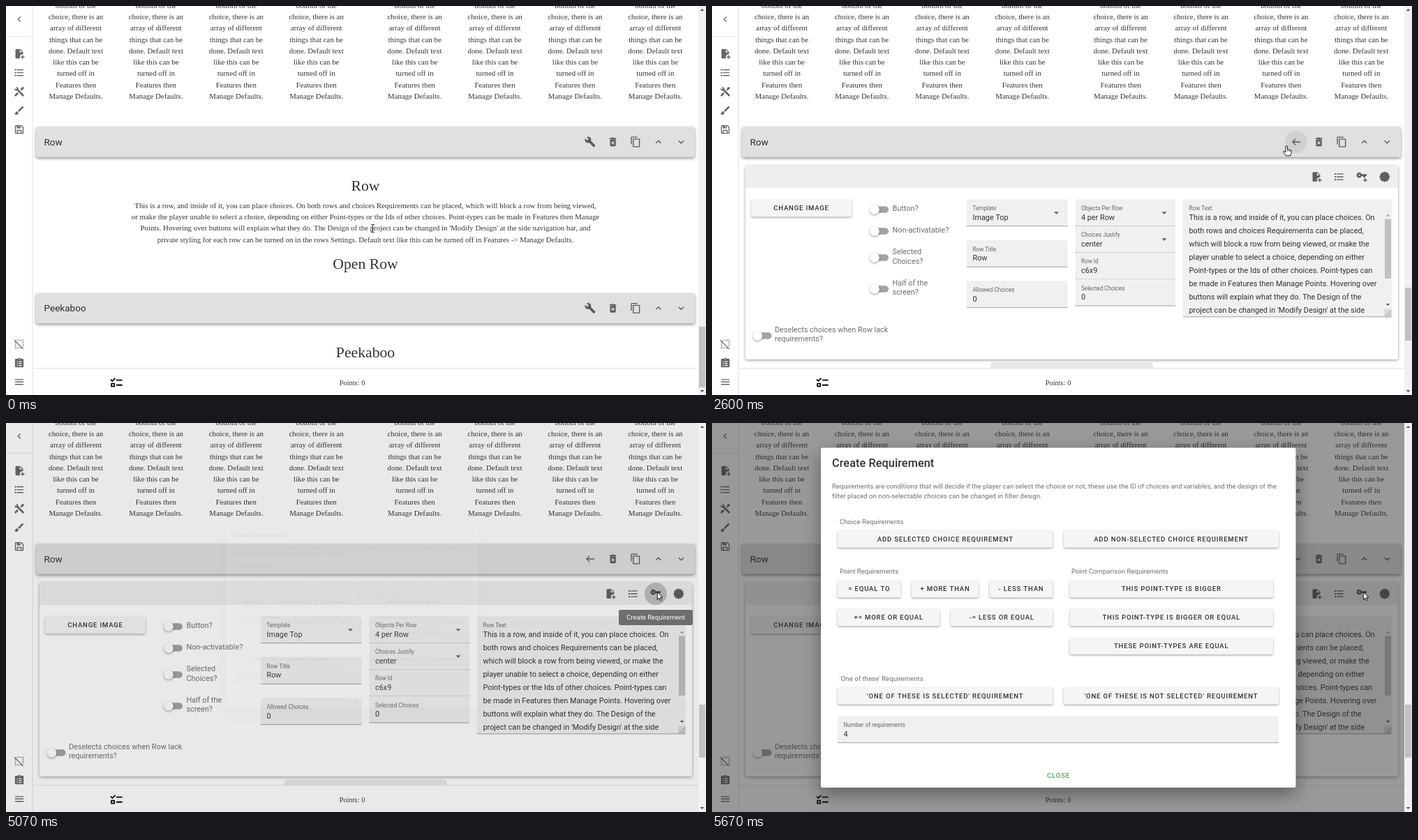
Write an HTML page with a canvas that moves like this. It is 1003 px wide and 558 px high and loops after 7.27 s.

```html
<!DOCTYPE html>
<html lang="en">
<head>
<meta charset="utf-8">
<title>Row editor</title>
<style>
html, body { margin: 0; width: 100%; height: 100%; overflow: hidden; background: #fff; }
canvas { display: block; }
</style>
</head>
<body>
<canvas id="stage" width="1003" height="558"></canvas>
<script>
const W = 1003, H = 558, LOOP = 7270, STEP = 1000 / 15;
const screenCtx = document.getElementById('stage').getContext('2d');
const layer = document.createElement('canvas');
layer.width = W;
layer.height = H;
const layerCtx = layer.getContext('2d');
let ctx = screenCtx;

const SANS = 'Roboto, sans-serif', SERIF = '"Liberation Serif", "Times New Roman", serif';
const Z = 0.6786; // page zoom
const BODY = 16 * Z, SMALL = 14 * Z, LABEL = 12 * Z;
const INK = 'rgba(0,0,0,.8)', SOFT = 'rgba(0,0,0,.58)', ICON = 'rgba(0,0,0,.6)';

const ICONS = {};
function defineIcon(name, d) { ICONS[name] = new Path2D(d); }
defineIcon('left', 'M15.4 16.6 10.8 12l4.6-4.6L14 6l-6 6 6 6z');
defineIcon('up', 'M7.4 15.4 12 10.8l4.6 4.6L18 14l-6-6-6 6z');
defineIcon('down', 'M7.4 8.6 12 13.2l4.6-4.6L18 10l-6 6-6-6z');
defineIcon('addFile', 'M14 2H6a2 2 0 0 0-2 2v16a2 2 0 0 0 2 2h7.8A6 6 0 0 1 20 13V8zM13 9V3.5L18.5 9zM18 15h2v3h3v2h-3v3h-2v-3h-3v-2h3z');
defineIcon('list', 'M7 5h14v2H7zM7 11h14v2H7zM7 17h14v2H7zM2.5 4.5h3v3h-3zM2.5 10.5h3v3h-3zM2.5 16.5h3v3h-3z');
defineIcon('tools', 'M21.7 20.3l-1.4 1.4a1 1 0 0 1-1.4 0L7 9.9A4 4 0 0 1 2.2 4.7l2.6 2.5 2.4-2.4L4.7 2.2A4 4 0 0 1 9.9 7l11.800 11.900a1 1 0 0 1 0 1.400zM2.300 18.900a1 1 0 0 0 0 1.400l1.400 1.400a1 1 0 0 0 1.400 0l5.500-5.400-2.800-2.900zM20 2l-4 2v2l-2.200 2.200 2 2L18 8h2l2-4z');
defineIcon('brush', 'M20.7 4.6l-1.3-1.3a1 1 0 0 0-1.4 0L9 12.3 11.8 15l9-9a1 1 0 0 0 0-1.4zM7 14a3 3 0 0 0-3 3c0 1.3-1.2 2-2 2a5.5 5.5 0 0 0 4 2 4 4 0 0 0 4-4 3 3 0 0 0-3-3z');
defineIcon('save', 'M5 3h12l4 4v12a2 2 0 0 1-2 2H5a2 2 0 0 1-2-2V5a2 2 0 0 1 2-2zM5 5v14h14V7.8L16.2 5zM7 5h8v4.5H7zM11.5 5h2v2.500h-2zM7 13h10v6H7zM9 15h6v4H9z');
defineIcon('selectOff', 'M1 4.3 2.3 3 21 21.7 19.7 23 17 20.3V21h-2v-2h.7L5 8.3V9H3V7h.7zM19 3h2v2h-2zM15 3h2v2h-2zM11 3h2v2h-2zM7 3h2v2H7zM11 19h2v2h-2zM7 19h2v2H7zM3 19h2v2H3zM3 15h2v2H3zM19 15h2v2h-2zM3 11h2v2H3zM19 11h2v2h-2zM19 7h2v2h-2z');
defineIcon('clipboard', 'M19 3h-4.2a3 3 0 0 0-5.6 0H5a2 2 0 0 0-2 2v14a2 2 0 0 0 2 2h14a2 2 0 0 0 2-2V5a2 2 0 0 0-2-2zM12 3a1 1 0 0 1 0 2 1 1 0 0 1 0-2zM7 8h2v2H7zM11 8h6v2h-6zM7 12h2v2H7zM11 12h6v2h-6zM7 16h2v2H7zM11 16h6v2h-6z');
defineIcon('menu', 'M3 6h18v2H3zM3 11h18v2H3zM3 16h18v2H3z');
defineIcon('wrench', 'M22.7 19l-9.1-9.1c.9-2.3.4-5-1.5-6.9-2-2-5-2.4-7.4-1.3L9 6 6 9 1.6 4.7C.4 7.1.9 10.1 2.9 12.1c1.9 1.9 4.6 2.4 6.9 1.5l9.1 9.1c.4.4 1 .4 1.4 0l2.3-2.3c.5-.4.5-1.1.1-1.4z');
defineIcon('trash', 'M6 19a2 2 0 0 0 2 2h8a2 2 0 0 0 2-2V7H6zM8.5 11.9l1.4-1.4L12 12.6l2.1-2.1 1.4 1.4L13.4 14l2.1 2.1-1.4 1.4L12 15.4l-2.1 2.1-1.4-1.4L10.6 14zM15.5 4l-1-1h-5l-1 1H5v2h14V4z');
defineIcon('copy', 'M19 21H8V7h11zM19 5H8a2 2 0 0 0-2 2v14a2 2 0 0 0 2 2h11a2 2 0 0 0 2-2V7a2 2 0 0 0-2-2zM16 1H4a2 2 0 0 0-2 2v14h2V3h12z');
defineIcon('back', 'M21 11v2H7l4.7 4.7-1.4 1.4L3.2 12l7.1-7.1 1.4 1.4L7 11z');
defineIcon('addKey', 'M6.5 3a5.5 5.5 0 1 0 5.1 7.5H15V14h4v-3.5h3v-4H11.6A5.5 5.5 0 0 0 6.5 3zM6.5 7a1.5 1.5 0 0 1 0 3 1.5 1.5 0 0 1 0-3zM18 15v3h-3v2h3v3h2v-3h3v-2h-3v-3z');
defineIcon('checks', 'M12 7h10v2.2H12zM12 15.2h10v2.2H12zM4 12.800h4.800a1 1 0 0 1 1 1v4.800a1 1 0 0 1-1 1H4a1 1 0 0 1-1-1v-4.800a1 1 0 0 1 1-1zM5 14.800v2.800h2.800v-2.800zM5.500 11.200 2 7.700l1.500-1.500 2 2L9.500 4.200l1.500 1.500z');

const seal = new Path2D();
for (let i = 0; i < 24; i++) {
  const r = i % 2 ? 9.6 : 11.2, a = i * Math.PI / 12;
  seal.lineTo(12 + r * Math.sin(a), 12 - r * Math.cos(a));
}
ICONS.seal = seal;

const HAND = new Path2D('M-1.3 8V1.2a1.3 1.3 0 0 1 2.6 0V5q1.5-.6 2 .5 1.5-.5 2 .6 1.6-.3 1.6 1.2V10l-1.2 2.3V14H-1l-3.4-5q-.8-1.5.6-1.7 1 0 2.5 2z');
const ARROW = new Path2D('M0 0V10.8L2.5 8.5 4.1 12.2 5.8 11.4 4.2 7.8 7.6 7.7z');
const BEAM = new Path2D('M-2.3-5.5H-.5L0-5 .5-5.5H2.3M0-5V5M-2.3 5.5H-.5L0 5 .5 5.5H2.3');
const KNUCKLES = new Path2D('M1.3 5v3M3.3 5.5v2.5M5.3 6.1v2');

const clamp = v => Math.max(0, Math.min(1, v));
const mix = (a, b, p) => a + (b - a) * p;
const smooth = p => p * p * (3 - 2 * p);

// Cubic-bezier timing, solved by bisection
function bezier(x1, y1, x2, y2) {
  const at = (a, b, u) => 3 * a * u * (1 - u) ** 2 + 3 * b * u * u * (1 - u) + u ** 3;
  return x => {
    if (x <= 0 || x >= 1) return clamp(x);
    let lo = 0, hi = 1;
    for (let i = 0; i < 24; i++) {
      const mid = (lo + hi) / 2;
      if (at(x1, x2, mid) < x) lo = mid; else hi = mid;
    }
    return at(y1, y2, lo);
  };
}
const easeDialog = bezier(0.25, 0.8, 0.25, 1);
const easeSwift = bezier(0.25, 0.8, 0.5, 1);

function rect(x, y, w, h, fill) {
  ctx.fillStyle = fill;
  ctx.fillRect(x, y, w, h);
}

function box(x1, y1, x2, y2, fill, shadow, radius = 2.7) {
  ctx.save();
  if (shadow) {
    ctx.shadowOffsetY = shadow[0];
    ctx.shadowBlur = shadow[1];
    ctx.shadowColor = `rgba(0,0,0,${shadow[2]})`;
  }
  ctx.fillStyle = fill;
  ctx.beginPath();
  ctx.roundRect(x1, y1, x2 - x1, y2 - y1, radius);
  ctx.fill();
  ctx.restore();
}

function disc(x, y, r, fill) {
  ctx.fillStyle = fill;
  ctx.beginPath();
  ctx.arc(x, y, r, 0, 7);
  ctx.fill();
}

// y is the visual middle of the line
function text(s, x, y, size, { font = SANS, weight = 400, color = INK, align = 'left', gap = 0 } = {}) {
  ctx.font = `${weight} ${size}px ${font}`;
  ctx.letterSpacing = gap + 'px';
  ctx.textAlign = align;
  ctx.fillStyle = color;
  ctx.fillText(s, x, y + size * 0.34);
}

const serif = (s, x, y, size = BODY) => text(s, x, y, size, { font: SERIF, align: 'center' });

function icon(name, x, y, size = 16.4, color = ICON) {
  ctx.save();
  ctx.translate(x - size / 2, y - size / 2);
  ctx.scale(size / 24, size / 24);
  ctx.fillStyle = color;
  ctx.fill(ICONS[name], 'evenodd');
  ctx.restore();
}

function triangle(x, y, w, h, color) {
  ctx.fillStyle = color;
  ctx.beginPath();
  ctx.moveTo(x - w, y - h);
  ctx.lineTo(x + w, y - h);
  ctx.lineTo(x, y + h);
  ctx.fill();
}

function button(label, x1, x2, y) {
  box(x1, y - 12.2, x2, y + 12.2, '#f5f5f5', [1.3, 3, 0.36]);
  text(label, (x1 + x2) / 2, y, SMALL, { weight: 500, align: 'center', gap: SMALL * 0.0893 });
}

function field(label, value, x1, x2, y, caret) {
  box(x1, y, x2, y + 38.5, '#f0f0f0', null, [2.7, 2.7, 0, 0]);
  rect(x1, y + 38, x2 - x1, 0.8, '#8c8c8c');
  text(label, x1 + 8.5, y + 13.2, LABEL, { color: SOFT });
  text(value, x1 + 8.5, y + 25.8, BODY);
  if (caret) triangle(x2 - 16, y + 19.7, 3.5, 1.8, ICON);
}

function toggle(x, y) {
  box(x - 2, y - 4.7, x + 20, y + 4.7, 'rgba(0,0,0,.36)', null, 4.7);
  box(x - 6.8, y - 6.8, x + 6.8, y + 6.8, '#fff', [1.3, 3.5, 0.38], 6.8);
}

function sidebar() {
  rect(0, 0, 38, H, '#fff');
  rect(37.5, 0, 1, H, '#e0e0e0');
  rect(0, 43, 38, 0.8, '#e0e0e0');
  icon('left', 19, 19);
  ['addFile', 'list', 'tools', 'brush', 'save'].forEach((n, i) => icon(n, 19, 68.5 + i * 27.15));
  ['selectOff', 'clipboard', 'menu'].forEach((n, i) => icon(n, 19, 485 + i * 27.15));
}

const BLURB = ['bottom of the', 'choice, there is an', 'array of different', 'things that can be', 'done. Default text',
  'like this can be', 'turned off in', 'Features then', 'Manage Defaults.'];
const INTRO = [
  'This is a row, and inside of it, you can place choices. On both rows and choices Requirements can be placed, which will block a row from being viewed,',
  'or make the player unable to select a choice, depending on either Point-types or the Ids of other choices. Point-types can be made in Features then Manage',
  "Points. Hovering over buttons will explain what they do. The Design of the project can be changed in 'Modify Design' at the side navigation bar, and",
  'private styling for each row can be turned on in the rows Settings. Default text like this can be turned off in Features -> Manage Defaults.'];
const ROW_TEXT = ['This is a row, and inside of it, you can place choices. On', 'both rows and choices Requirements can be placed,',
  'which will block a row from being viewed, or make the', 'player unable to select a choice, depending on either',
  'Point-types or the Ids of other choices. Point-types can', 'be made in Features then Manage Points. Hovering over',
  'buttons will explain what they do. The Design of the', "project can be changed in 'Modify Design' at the side"];

function header(title, y, first, glow) {
  box(43, y - 21.8, 987, y + 21.8, '#e0e0e0', [2, 4.5, 0.42]);
  text(title, 54.5, y, 20 * Z);
  if (glow) disc(837, y, 16, `rgba(0,0,0,${glow})`);
  [first, 'trash', 'copy', 'up', 'down'].forEach((n, i) => icon(n, 837 + i * 32.6, y));
}

function closedRow() {
  serif('Row', 515, 258, 32 * Z);
  INTRO.forEach((s, i) => serif(s, 515, 286 + i * 16.3));
  serif('Open Row', 515, 370, 32 * Z);
  header('Peekaboo', 433.5, 'wrench', 0);
  serif('Peekaboo', 515, 496.5, 32 * Z);
}

function editor(glow) {
  box(48, 229, 983, 507, '#fff', [1.3, 4, 0.38]);
  box(48, 229, 983, 261, '#eee', null, [2.7, 2.7, 0, 0]);
  if (glow) disc(931, 245, 16, `rgba(0,0,0,${glow})`);
  ['addFile', 'list', 'addKey', 'seal'].forEach((n, i) => icon(n, 866 + i * 32.6, 245));

  button('CHANGE IMAGE', 56, 200, 290);
  [292, 323, 361, 406].forEach(y => toggle(233, y));
  toggle(65.5, 473);
  const note = (s, x, y) => text(s, x, y, BODY, { color: SOFT });
  note('Button?', 258.5, 290);
  note('Non-activatable?', 258.5, 321);
  note('Selected', 258.5, 352.5);
  note('Choices?', 258.5, 366);
  note('Half of the', 258.5, 397);
  note('screen?', 258.5, 410.5);
  note('Deselects choices when Row lack', 90, 464);
  note('requirements?', 90, 477.5);

  field('Template', 'Image Top', 365, 509.5, 277.3, true);
  field('Row Title', 'Row', 365, 509.5, 335.8);
  field('Allowed Choices', '0', 365, 509.5, 394.3);
  field('Objects Per Row', '4 per Row', 520.5, 664, 277.3, true);
  field('Choices Justify', 'center', 520.5, 664, 315.4, true);
  field('Row Id', 'c6x9', 520.5, 664, 353.5);
  field('Selected Choices', '0', 520.5, 664, 391.6);

  box(675, 277.3, 974, 446, '#f0f0f0', null, [2.7, 2.7, 0, 0]);
  text('Row Text', 683.5, 290.5, LABEL, { color: SOFT });
  ROW_TEXT.forEach((s, i) => text(s, 683.5, 303 + i * 19, BODY));
  rect(963, 295, 11, 139, '#f1f1f1');
  rect(964, 305.5, 9, 85.5, '#c1c1c1');
  triangle(968.5, 300, 2.8, -1.5, '#a0a0a0');
  triangle(968.5, 428.5, 2.8, 1.5, '#505050');
  rect(963, 434.5, 11, 11.5, '#dcdcdc');
  ctx.strokeStyle = '#777';
  ctx.lineWidth = 0.7;
  ctx.beginPath();
  for (const d of [4, 8]) {
    ctx.moveTo(973 - d, 445);
    ctx.lineTo(973, 445 - d);
  }
  ctx.stroke();
  rect(675, 445.5, 299, 0.8, '#8c8c8c');
  box(400, 512, 630.5, 530, '#e8e8e8', [0.5, 2, 0.35]);
}

function footer() {
  rect(38, 519.5, 954, 39, '#fff');
  rect(38, 519.3, 954, 1, '#e2e2e2');
  icon('checks', 158, 540, 20.8, '#000');
  serif('Points: 0', 496, 540, 10.4);
}

function scrollbar(top, bottom) {
  rect(992, 0, 11, H, '#f1f1f1');
  rect(993, top, 9, bottom - top, '#c1c1c1');
  triangle(997.5, 5.5, 2.8, -1.5, '#505050');
  triangle(997.5, 552.5, 2.8, 1.5, '#505050');
}

function tooltip(scale, alpha) {
  ctx.save();
  ctx.globalAlpha = alpha;
  ctx.translate(931, 279);
  ctx.scale(scale, scale);
  box(-53, -11, 53, 11, 'rgba(97,97,97,.9)');
  text('Create Requirement', 0, 0, SMALL, { color: '#fff', align: 'center' });
  ctx.restore();
}

function dialogContent() {
  box(156, 35.5, 836.5, 523, '#fff', [9, 26, 0.4]);
  text('Create Requirement', 172, 57, 24 * Z, { weight: 500, gap: 0.08 });
  const soft = (s, x, y) => text(s, x, y, SMALL, { color: SOFT, gap: 0.067 });
  soft('Requirements are conditions that will decide if the player can select the choice or not, these use the ID of choices and variables, and the design of the', 172, 90.5);
  soft('filter placed on non-selectable choices can be changed in filter design.', 172, 105);
  soft('Choice Requirements', 183, 141.5);
  button('ADD SELECTED CHOICE REQUIREMENT', 180, 488.5, 166.5);
  button('ADD NON-SELECTED CHOICE REQUIREMENT', 504, 812, 166.5);
  soft('Point Requirements', 183, 213);
  button('= EQUAL TO', 180, 270.5, 238);
  button('+ MORE THAN', 286, 382, 238);
  button('- LESS THAN', 397.5, 488.5, 238);
  button('+= MORE OR EQUAL', 180, 326.5, 279);
  button('-= LESS OR EQUAL', 342, 488.5, 279);
  soft('Point Comparison Requirements', 515, 213);
  button('THIS POINT-TYPE IS BIGGER', 512.5, 804, 238);
  button('THIS POINT-TYPE IS BIGGER OR EQUAL', 512.5, 804, 279);
  button('THESE POINT-TYPES ARE EQUAL', 512.5, 804, 319.8);
  soft("'One of these' Requirements", 183, 366.5);
  button("'ONE OF THESE IS SELECTED' REQUIREMENT", 180, 488.5, 391.5);
  button("'ONE OF THESE IS NOT SELECTED' REQUIREMENT", 504, 812, 391.5);
  field('Number of requirements', '4', 180, 812, 420.3);
  text('CLOSE', 496.5, 506, SMALL, { weight: 500, color: '#43a547', align: 'center', gap: SMALL * 0.0893 });
}

function dialog(p) {
  if (p <= 0) return;
  const scale = mix(0.5, 1, p);
  ctx = layerCtx;
  ctx.clearRect(0, 0, W, H);
  ctx.save();
  ctx.translate(496.2, 279.2);
  ctx.scale(scale, scale);
  ctx.translate(-496.2, -279.2);
  dialogContent();
  ctx.restore();
  ctx = screenCtx;
  ctx.globalAlpha = p;
  ctx.drawImage(layer, 0, 0);
  ctx.globalAlpha = 1;
}

// Pointer stops: time, x, y
const PATH = [[733, 525.5, 319], [1467, 829, 209], [1800, 834, 194.5], [2467, 834, 194.5],
  [2733, 811, 207], [3200, 922, 228], [3400, 933.3, 242.5]];

function pointerAt(t) {
  const i = PATH.findIndex(k => k[0] > t);
  if (i === 0) return PATH[0].slice(1);
  if (i < 0) return PATH[PATH.length - 1].slice(1);
  const [a, b] = [PATH[i - 1], PATH[i]];
  const p = smooth((t - a[0]) / (b[0] - a[0]));
  return [mix(a[1], b[1], p), mix(a[2], b[2], p)];
}

function pointer(t) {
  const [x, y] = pointerAt(t);
  const near = (cx, cy) => Math.hypot(x - cx, y - cy) < 16;
  ctx.save();
  ctx.translate(x, y);
  ctx.lineJoin = 'round';
  ctx.strokeStyle = '#000';
  ctx.fillStyle = '#fff';
  ctx.lineWidth = 0.9;
  if (t < 2000 && x < 850 && y > 278) {
    ctx.stroke(BEAM);
  } else if (near(837, 195) || (t < 5050 && near(931, 245))) {
    ctx.translate(0.8, 0);
    ctx.fill(HAND);
    ctx.stroke(HAND);
    ctx.lineWidth = 0.6;
    ctx.stroke(KNUCKLES);
  } else {
    ctx.fill(ARROW);
    ctx.stroke(ARROW);
  }
  ctx.restore();
}

// Last value whose start time has passed
const stage = (t, ...steps) => steps.reduce((v, [at, next]) => t >= at ? next : v, 0);

function draw(time) {
  const t = Math.floor(time / STEP + 0.001) * STEP + 0.5;
  const editing = t > 2133;
  rect(0, 0, W, H, '#fff');
  for (let c = 0; c < 8; c++) {
    const x = 100 + c * 114.9 + (c > 3 ? 26 : 0);
    BLURB.forEach((s, i) => serif(s, x, -1 + i * 16.3));
  }
  header('Row', 195, editing ? 'back' : 'wrench',
    stage(t, [2000, 0.1], [2066, 0.22], [2133, 0.17], [2333, 0.07], [5066, 0]));
  if (editing) editor(stage(t, [3333, 0.04], [4933, 0.12], [5000, 0.2], [5266, 0.12], [5333, 0.06], [5400, 0]));
  else closedRow();
  footer();
  sidebar();

  const shade = 0.46 * easeSwift((t - 5046) / 300);
  if (shade) rect(0, 0, 992, H, `rgba(33,33,33,${shade})`);
  if (editing) scrollbar(404, 480);
  else scrollbar(460, 547);

  const tip = easeSwift((t - 4315) / 300);
  const tipAlpha = tip * (1 - clamp((t - 5070) / 150));
  if (tipAlpha > 0) tooltip(tip, tipAlpha);
  dialog(easeDialog((t - 5061) / 314));
  pointer(t);
}

function frame() {
  draw(performance.now() % LOOP);
  requestAnimationFrame(frame);
}
frame();
</script>
</body>
</html>
```
